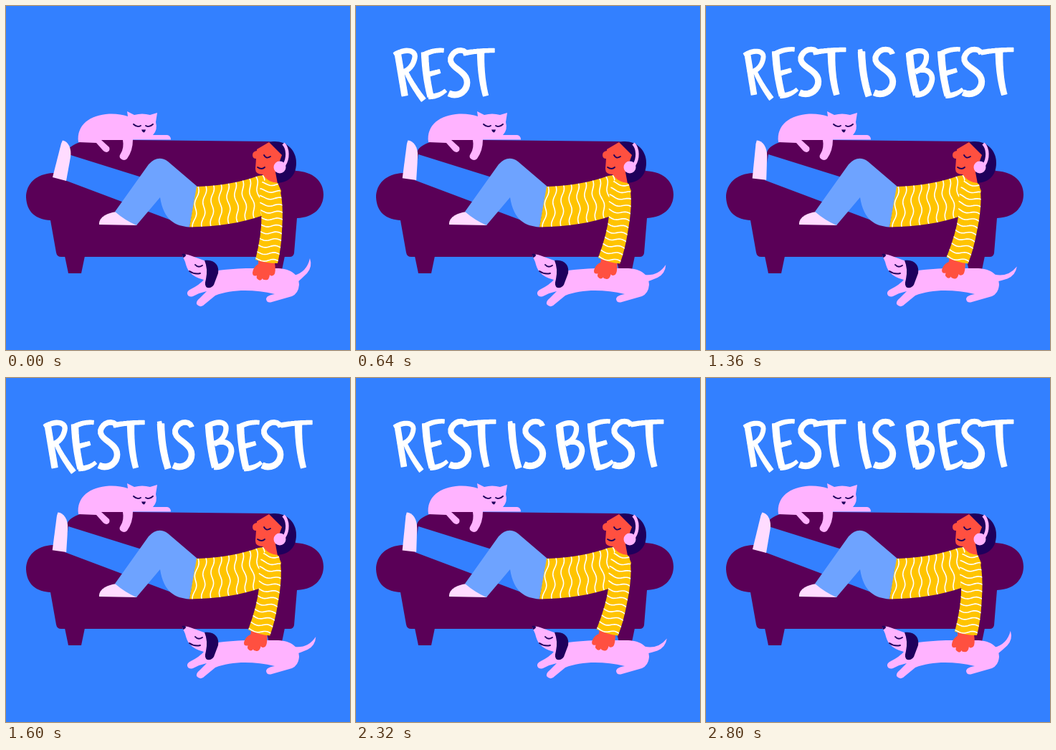
An HTML page for the animation above (2880 ms loop, 480 by 480 pixels).

```html
<!DOCTYPE html>
<html lang="en">
<head>
<meta charset="utf-8">
<title>Rest is best</title>
<style>
  html, body { margin: 0; height: 100%; overflow: hidden; background: #3380ff; }
  svg { display: block; width: 100vw; height: 100vh; }
  .sofa { fill: #5a0057; }
  .pink { fill: #ffb3ff; }
  .pale { fill: #ffdcff; }
  .sky { fill: #3380ff; }
  .denim { fill: #6ea3ff; }
  .shirt { fill: #ffc400; }
  .skin { fill: #ff5040; }
  .navy { fill: #1f005c; }
  .line { fill: none; stroke: #1f005c; stroke-width: 1.9; stroke-linecap: round; }
  .wave { fill: none; stroke: #fff; stroke-width: 1.6; }
  .word { fill: #fff; stroke: #fff; stroke-width: 1.4; stroke-linejoin: round; }
</style>
</head>
<body>
<svg viewBox="0 0 480 480" role="img" aria-label="REST IS BEST">
  <defs>
    <clipPath id="torsoClip"><path id="torso" d="M266 252C299 251 327 246 352 237L359 236Q367 247 379 247L384 258L376 286L356 293C327 303 294 308 256 308.500Z"/></clipPath>
    <clipPath id="sleeveClip"><path id="sleeve" d="M355 250Q358 240 368 245L379 247C386 262 387 288 385 314Q384 338 379 359Q363 359 348 354Q357 318 356.500 292Q352 270 355 250Z"/></clipPath>
  </defs>

  <g id="sofa" class="sofa">
    <path d="M66 233C42 234 28 248 28 267C29 288 42 298 62 299L70 344Q71 350 77 350H396Q401 350 402 345L406 296C430 295 443 281 443 263C443 244 428 231 404 230L384 195Q379 189 365 189L130 186.500C105 186 85 195 85 206L87 240Z"/>
    <path d="M82 349H110L105 373H87ZM362 349H389L384 373H368Z"/>
  </g>

  <g id="cat">
    <path class="pink" d="M101 190C98 166 117 152 144 150.500Q159 150 170 154L169 147L179 152Q190 149 201 152L211 149L209 162Q212 173 205 180H225Q230 181 230 186.500H177Q177 202 169 213Q165 217 160 213Q157 210 160 206Q165 198 163 187L133 187L144 197Q146 202 141 204Q137 204 134 200L126 191Z"/>
    <path class="line" d="M178 165Q183 170 188 167M195 167Q200 170 205 165"/>
    <path class="navy" d="M189 172.500H195Q194 176.500 192 176.500Q190 176 189 172.500Z"/>
  </g>

  <g id="legs">
    <path class="sky" d="M87 207L250 258L244 304L82 243Z"/>
    <g id="foot"><path class="pale" d="M79 187.500C87 189 92 199 90 211L84 244L65 239L77 192Z"/></g>
    <path class="pale" d="M154 287C139 289 129 296 130 305L183 306Z"/>
    <path class="denim" d="M152 287L199 221Q212 207 226 217L267 252L256 308.500C236 307 220 299 215 267L182 306Q166 299 152 287Z"/>
  </g>

  <g id="head">
    <path class="navy" d="M365 191C383 184 405 196 405 219C405 237 394 247 376 247L371 225Z"/>
    <path class="skin" d="M367 190L350 200V202Q344 203 344 208Q344 213 349 213L348 227Q348 235 358 235Q364 247 379 248L376 232L385 208Z"/>
    <path class="line" d="M360 208Q363 214 369 210M351 225Q357 229 361 225"/>
    <path d="M387 192C394 199 394 213 388 222" fill="none" stroke="#ffb3ff" stroke-width="4.500"/>
    <circle class="pink" cx="382" cy="225" r="8.500"/>
  </g>

  <use href="#torso" class="shirt"/>
  <g id="torsoWaves" class="wave" clip-path="url(#torsoClip)"></g>

  <g id="dog">
    <g id="tail"><path class="pink" d="M402 376Q420 371 424 352Q428 364 420 373Q413 380 406 386Z"/></g>
    <path class="pink" d="M246 348Q250 345 257 348L279 356L296 369Q312 367 335 366L380 366C398 367 409 375 409 389Q408 401 399 405L371 413Q364 415 363 409Q363 405 370 403L375 402C346 395 314 395 292 404L275 418Q270 421 266 416Q265 412 270 408L280 398Q270 400 261 405Q255 407 253 402Q252 398 258 395Q270 389 276 382Q263 379 256 371Q252 366 250 357Z"/>
    <path class="navy" d="M277 355C291 353 298 362 296 373L290 389Q287 394 281 393Q276 391 279 381Q282 367 277 355Z"/>
    <path class="navy" d="M245.500 346Q249 345 251 347Q251 350 247 351Z"/>
    <path class="line" d="M264 361Q268 366 274 362M256 370Q263 375 271 373"/>
  </g>

  <g id="arm">
    <path class="skin" d="M352 354L375 358Q377 372 374 375Q370 378 368 375Q367 384 361 382Q358 382 358 380Q355 385 351 381Q349 380 350 376Q344 378 344 372Q345 364 352 360Z"/>
    <use href="#sleeve" class="shirt"/>
    <g id="sleeveWaves" class="wave" clip-path="url(#sleeveClip)"></g>
  </g>

  <g id="text" class="word"></g>
</svg>
<script>
  const LOOP = 2880, STEP = 80, SWING = 960, BOIL = 240, BOIL_START = 160;
  const $ = id => document.getElementById(id);

  function add(parent, tag, attrs = {}) {
    const el = document.createElementNS('http://www.w3.org/2000/svg', tag);
    for (const k in attrs) el.setAttribute(k, attrs[k]);
    if (parent) parent.append(el);
    return el;
  }

  const toPath = pts => 'M' + pts.map(p => p.map(v => v.toFixed(1)).join(' ')).join('L');

  // Wavy stripes across the torso and the sleeve
  function stripes() {
    for (let i = 0; i < 10; i++) {
      const pts = [];
      for (let y = 230; y <= 312; y += 2) {
        const lean = (-6 + i * 2.2) * (y - 250) / 57;
        pts.push([268 + i * 10.3 + lean + 2 * Math.sin((y + i * 2) / 5), y]);
      }
      add($('torsoWaves'), 'path', { d: toPath(pts) });
    }
    for (let i = 0; i < 12; i++) {
      const pts = [];
      for (let x = 344; x <= 390; x += 2) {
        pts.push([x, 248 + i * 9.7 + (x - 365) * 0.1 + 2 * Math.sin(x / 4.8 + i * 0.2)]);
      }
      add($('sleeveWaves'), 'path', { d: toPath(pts) });
    }
  }

  // Outline of a brush stroke along a curve, tapering from w0 to w1
  function brush(d, w0, w1) {
    const curve = add(null, 'path', { d });
    const len = curve.getTotalLength(), n = 28, left = [], right = [];
    for (let i = 0; i <= n; i++) {
      const s = len * i / n;
      const p = curve.getPointAtLength(s);
      const a = curve.getPointAtLength(Math.max(0, s - 0.6));
      const b = curve.getPointAtLength(Math.min(len, s + 0.6));
      const h = Math.hypot(b.x - a.x, b.y - a.y) || 1;
      const w = (w0 + (w1 - w0) * i / n) / 2;
      const nx = (a.y - b.y) / h * w, ny = (b.x - a.x) / h * w;
      left.push([p.x + nx, p.y + ny]);
      right.unshift([p.x - nx, p.y - ny]);
    }
    return toPath(left.concat(right)) + 'Z';
  }

  // Strokes per letter: curve, start width, end width
  const GLYPHS = {
    R: [['M6 5L16 65', 8, 8], ['M2 8C16 -1 32 1 30 12C28 23 22 29 14 32', 6, 6], ['M17 30Q26 50 42 71', 5, 7]],
    E: [['M6 5Q7 38 14 66', 9, 8], ['M5 8Q17 1 32 2', 6, 5], ['M9 36L27 31', 6, 5], ['M12 66Q24 67 35 58', 7, 4]],
    S: [['M28 8C26 -1 9 -1 5 13C3 25 22 29 27 41C32 55 18 69 3 62', 6, 8]],
    T: [['M0 6Q20 2 43 2', 6, 5], ['M24 4Q24 40 31 65', 9, 7]],
    I: [['M2 4L7 3', 5, 5], ['M6 4Q7 38 16 66', 9, 8]],
    B: [['M5 6Q7 38 14 64', 9, 9], ['M2 8C15 -1 30 0 29 11C28 23 21 28 13 32', 6, 6], ['M14 31C28 25 39 34 36 45C33 59 23 65 13 64', 6, 7]]
  };

  const WORDS = [
    { at: 400, set: [['R', 52], ['E', 90], ['S', 127], ['T', 150]] },
    { at: 880, set: [['I', 210], ['S', 231]] },
    { at: 1360, set: [['B', 278], ['E', 321], ['S', 355], ['T', 384]] }
  ];

  // Second drawing of each letter: shift, turn and scale
  const REDRAWN = {
    R: 'translate(0 1) scale(.93 .96)',
    E: 'translate(1 -1) rotate(-1)',
    S: 'translate(0 -1) rotate(-1) scale(1.03 1)',
    T: 'translate(0 -1) scale(1.04 .99)',
    I: 'translate(1 0) scale(1 .99)',
    B: 'translate(1 1) rotate(-1) scale(.98)'
  };

  function lettering() {
    const shapes = {};
    for (const k in GLYPHS) shapes[k] = GLYPHS[k].map(s => brush(...s));
    for (const word of WORDS) {
      word.drawings = [0, 1].map(alt => {
        const g = add($('text'), 'g');
        for (const [k, x] of word.set) {
          const spot = `translate(${x} 60) ${alt ? REDRAWN[k] : ''}`;
          const letter = add(g, 'g', { transform: spot });
          for (const d of shapes[k]) add(letter, 'path', { d });
        }
        return g;
      });
    }
  }

  const turn = (id, deg, x, y) =>
    $(id).setAttribute('transform', `rotate(${deg.toFixed(3)} ${x} ${y})`);

  function draw(ms) {
    const t = Math.floor((ms % LOOP) / STEP) * STEP;
    const swing = 1 - Math.cos(2 * Math.PI * t / SWING);
    turn('arm', 4.2 * swing, 368, 262);
    turn('tail', 14.6 * swing, 405, 378);
    turn('foot', -4.6 * swing, 75, 242);
    const alt = Math.floor((t - BOIL_START) / BOIL) & 1;
    for (const { at, drawings } of WORDS) {
      drawings.forEach((g, i) => g.setAttribute('display', t >= at && i === alt ? 'inline' : 'none'));
    }
  }

  stripes();
  lettering();
  draw(0);
  const start = performance.now();
  (function tick() {
    draw(performance.now() - start);
    requestAnimationFrame(tick);
  })();
</script>
</body>
</html>
```
